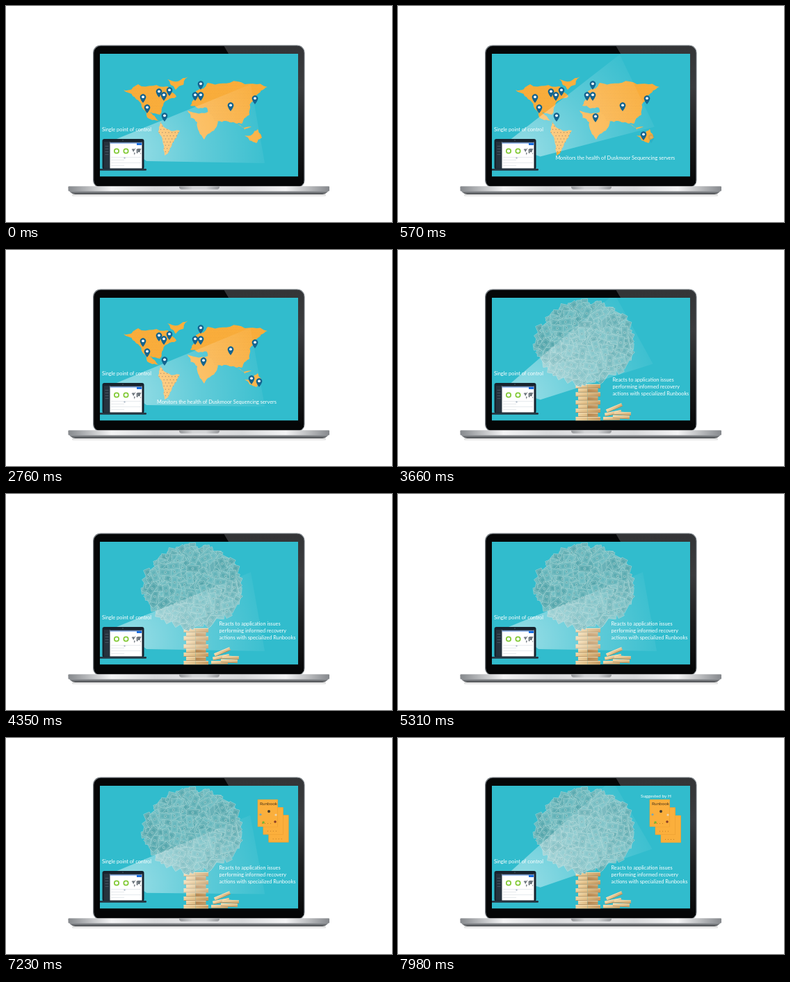
An HTML page with a canvas that plays this animation: 555x312 px, repeating every 8 s.

```html
<!DOCTYPE html>
<html lang="en">
<head>
<meta charset="utf-8">
<title>Single point of control</title>
<style>
html, body { margin: 0; width: 100%; height: 100%; overflow: hidden; background: #fff; }
canvas { display: block; width: 555px; height: 312px; }
</style>
</head>
<body>
<canvas id="stage" width="555" height="312"></canvas>
<script>
const W = 555, H = 312, LOOP = 8000;
const SCREEN = [135, 69, 285, 177.5];
const TEAL = '#31bccd', ORANGE = '#fbaf3c';
let ctx = document.getElementById('stage').getContext('2d');

const clamp = v => Math.max(0, Math.min(1, v));
const ramp = (t, from, to) => clamp((t - from) / (to - from));
const easeOut = v => 1 - (1 - v) ** 3;
const mix = (a, b, k) => a + (b - a) * k;
const seeded = seed => () => (seed = (seed * 16807) % 2147483647) / 2147483647;

function box(x, y, w, h, fill, radius = 0) {
  ctx.fillStyle = fill;
  ctx.beginPath();
  ctx.roundRect(x, y, w, h, radius);
  ctx.fill();
}
function disc(x, y, r, fill) {
  ctx.fillStyle = fill;
  ctx.beginPath();
  ctx.arc(x, y, r, 0, 7);
  ctx.fill();
}
const polygon = points => new Path2D('M' + points.join(' ') + 'Z');
function shape(path, fill) {
  ctx.fillStyle = fill;
  ctx.fill(path);
}
function text(str, x, y, size = 7.35, fill = '#fff') {
  ctx.font = size + 'px Lato, sans-serif';
  ctx.fillStyle = fill;
  ctx.fillText(str, x, y);
}
function gradient(x0, y0, x1, y1, ...colors) {
  const g = ctx.createLinearGradient(x0, y0, x1, y1);
  colors.forEach((c, i) => g.addColorStop(i / (colors.length - 1), c));
  return g;
}
function scoped(draw) {
  ctx.save();
  draw();
  ctx.restore();
}
function withAlpha(alpha, draw) {
  if (alpha > 0) scoped(() => { ctx.globalAlpha *= alpha; draw(); });
}
// Paints a still picture once and returns it as a layer.
function still(draw) {
  const layer = new OffscreenCanvas(W, H), outer = ctx;
  ctx = layer.getContext('2d');
  draw();
  ctx = outer;
  return layer;
}

// Roughens the outline through a few corner points into a coast.
function coast(corners, seed) {
  const rand = seeded(seed);
  let points = corners;
  for (let pass = 0; pass < 3; pass++)
    points = points.flatMap(([x, y], i) => {
      const [x2, y2] = points[(i + 1) % points.length];
      const bend = (rand() - .5) * .32;
      return [[x, y], [(x + x2) / 2 + (y2 - y) * bend, (y + y2) / 2 - (x2 - x) * bend]];
    });
  return polygon(points);
}
const northAmerica = coast([[169, 121], [190, 113], [232, 116], [245, 131], [224, 147], [221, 157], [207, 154], [223, 168], [203, 161], [190, 136]], 11);
const southAmerica = coast([[222, 168], [250, 180], [239, 198], [228, 216], [219, 182]], 5);
const eurasia = coast([[265, 144], [273, 123], [290, 111], [333, 109], [376, 117], [359, 130], [350, 157], [339, 170], [322, 168], [299, 165], [289, 147]], 23);
const lands = [
  northAmerica, southAmerica, eurasia,
  coast([[232, 106], [262, 102], [255, 114], [244, 121]], 8),
  coast([[261, 151], [293, 150], [305, 161], [299, 180], [285, 193], [275, 168]], 9),
  coast([[343, 187], [362, 178], [368, 190], [360, 198]], 4),
  coast([[333, 171], [354, 174], [343, 179]], 3)
];
function halftone(land, step, radius, tint) {
  scoped(() => {
    ctx.clip(land);
    for (let y = 100, row = 0; y < 220; y += step, row++)
      for (let x = 165 + (row % 2) * step / 2; x < 380; x += step) disc(x, y, radius, tint);
  });
}
const mapLayer = still(() => {
  for (const land of lands) shape(land, ORANGE);
  halftone(northAmerica, 2.4, .5, '#e79c35');
  halftone(eurasia, 2.4, .5, '#e79c35');
  halftone(southAmerica, 4.6, .75, '#8a5a24');
});

const oldPins = [[197, 140], [220, 132], [227, 137], [235, 130], [203, 155], [228, 167], [280, 121], [272, 137], [280, 137], [323, 152], [358, 142]];
const newPins = [[284, 168], [353, 194], [364, 198]];
function pin([x, y]) {
  ctx.fillStyle = '#14648f';
  ctx.beginPath();
  ctx.arc(x, y - 8.5, 4.4, Math.PI * .88, Math.PI * .12);
  ctx.quadraticCurveTo(x + 3, y - 3.5, x, y);
  ctx.quadraticCurveTo(x - 3, y - 3.5, x - 4.2, y - 7);
  ctx.fill();
  disc(x, y - 8.7, 1.9, '#fff');
}
function drawPins(t) {
  oldPins.forEach(pin);
  newPins.forEach((p, i) => withAlpha(ramp(t, 150 + 200 * i, 300 + 200 * i), () => pin(p)));
}

// Money tree on a tower of wooden blocks
function bill(x, y, angle, shade) {
  scoped(() => {
    ctx.translate(x, y);
    ctx.rotate(angle);
    box(-8.5, -4.5, 17, 9, `rgb(${86 + shade},${166 + shade},${172 + shade})`);
    ctx.lineWidth = .7;
    ctx.strokeStyle = '#a3d3d3';
    ctx.strokeRect(-8.5, -4.5, 17, 9);
    ctx.lineWidth = .4;
    ctx.strokeRect(-6.7, -2.9, 13.4, 5.8);
    disc(0, 0, 2, '#94c8c8');
    disc(0, 0, 1.1, '#62a8ae');
  });
}
function drawCanopy() {
  const rand = seeded(77), rim = 60, total = 280;
  ctx.fillStyle = '#69b2b8';
  ctx.beginPath();
  ctx.ellipse(268.5, 133.5, 60, 50, 0, 0, 7);
  ctx.fill();
  for (let i = 0; i < total; i++) {
    const onRim = i < rim;
    const angle = onRim ? i / rim * 2 * Math.PI : rand() * 2 * Math.PI;
    const r = onRim ? .94 + rand() * .1 : Math.sqrt(rand()) * .94;
    bill(268.5 + Math.cos(angle) * r * 64, 133.5 + Math.sin(angle) * r * 53, rand() * Math.PI, rand() * 22);
  }
}
function slab(x, y, w, h, light, dark) {
  box(x, y, w, h, gradient(x, 0, x + w, 0, light, dark));
  box(x, y, w, .9, '#f5e0b8');
  box(x, y + h - .7, w, .7, '#a67c49');
}
function drawTower() {
  for (let i = 0; i < 9; i++) {
    const y = 241 - i * 5.9, inset = i % 2 * 3.5;
    slab(255.5 + inset, y, 17 - inset, 5.8, '#efd3a2', '#dfbd86');
    slab(272.5, y, 18.5 - inset, 5.8, i % 2 ? '#b98a55' : '#d9b57d', '#c79d65');
  }
  for (let i = 0; i < 5; i++)
    scoped(() => {
      ctx.translate(295 + i % 2 * 13 + i, 241 - i * 2.6);
      ctx.rotate(i % 2 ? .05 : -.1 * i);
      slab(0, 0, 24, 4.6, '#f0d6a6', '#d6b079');
    });
}
const treeLayer = still(() => {
  drawTower();
  drawCanopy();
});

// The beam tilts up and back in 1650 ms, then rests until the next start.
function tiltAt(t) {
  const start = [7150, 5400, 2700, 0].find(s => t >= s);
  return Math.sin(Math.PI * ramp(t, start, start + 1650)) ** 2;
}
function drawBeam(t) {
  const tilt = -.35 * tiltAt(t), [cx, cy] = [180, 212];
  const swing = (dx, dy) => [
    cx + dx * Math.cos(tilt) - dy * Math.sin(tilt),
    cy + dx * Math.sin(tilt) + dy * Math.cos(tilt)
  ];
  const glow = ctx.createRadialGradient(cx, cy, 15, cx, cy, 205);
  glow.addColorStop(0, 'rgba(255,255,255,.45)');
  glow.addColorStop(.45, 'rgba(255,255,255,.23)');
  glow.addColorStop(1, 'rgba(255,255,255,.03)');
  shape(polygon([swing(-21, -20), swing(172, -99), swing(192, 15), swing(22, 12)]), glow);
}

// Small computer in the corner, with a miniature of the map
function drawConsole() {
  box(138.5, 192, 60, 44, '#17222d', 3);
  box(141, 196, 8.5, 38.5, '#27333e');
  box(149.5, 196, 46, 38.5, '#fff');
  box(149.5, 196, 46, 1.6, '#303c49');
  box(149.5, 197.6, 46, 1, '#4c86dc');
  box(188, 198, 7, 3, '#176de1');
  for (let i = 0; i < 4; i++) box(142.5, 202 + i * 4, 5, .6, '#667481');
  for (const x of [159, 172.5]) {
    ctx.strokeStyle = '#82c936';
    ctx.lineWidth = 1.7;
    ctx.beginPath();
    ctx.arc(x, 209.5, 3.2, 0, 7);
    ctx.stroke();
  }
  scoped(() => {
    ctx.translate(168.5, 196);
    ctx.scale(.07, .09);
    for (const land of lands) shape(land, '#6f777e');
  });
  for (let i = 0; i < 4; i++) box(151, 218 + i * 4, i % 2 ? 19 : 43, .6, '#ced6dc');
  disc(170.5, 219.5, 1.2, '#b5c0cb');
  disc(168, 194, .5, '#8996a0');
  box(134, 235, 68, 2.7, '#253642', 1.3);
}

function drawSheets(t) {
  const fan = easeOut(ramp(t, 6900, 7350));
  withAlpha(ramp(t, 6150, 6350), () => {
    for (let i = 2; i >= 0; i--) {
      const x = 362 + 8 * i * fan, y = 89 + 11.5 * i * fan;
      box(x - .3, y - .3, 29.1, 39.6, '#e2952b');
      box(x, y, 28.5, 39, ORANGE);
      if (fan > 0) for (let d = 0; d < 4; d++) box(x + 6 + d * 4, y + 34, 1, .7, '#a96b20');
    }
  });
  withAlpha(ramp(t, 6600, 6850), () => {
    text('Runbook', 365, 97, 6.4, '#4a3518');
    disc(378, 106, 2, '#493b2d');
    disc(366, 110.5, 1.6, '#7ba5b0');
    disc(388, 111, 1.6, '#e9d6b0');
    disc(370, 122, 1.8, '#75b536');
    disc(387, 121, 1.8, '#8a3f27');
  });
  text('Suggested by H'.slice(0, Math.floor(ramp(t, 7380, 7960) * 14)), 349, 86, 6.4);
}

// Captions glide in from beyond the right edge of the screen.
function drawCaption(t, start, lines, x, y) {
  const left = mix(421, x, easeOut(ramp(t, start, start + 890)));
  lines.forEach((line, i) => text(line, left, y + i * 9.6));
}

const computerLayer = still(() => {
  box(125, 56.5, 304.5, 206, '#777d82', 11);
  box(126.3, 57.7, 302, 204, '#050607', 10);
  scoped(() => {
    ctx.beginPath();
    ctx.roundRect(126.3, 57.7, 302, 204, 10);
    ctx.clip();
    shape(polygon([[313, 57], [429, 57], [429, 258], [420, 247], [420, 69], [320, 69]]),
      gradient(370, 57, 400, 258, '#333436', '#3a3b3d', '#1c1d1e', '#060708'));
  });
  box(95, 271, 365, 5, gradient(0, 271, 0, 276, 'rgba(0,0,0,.2)', 'rgba(0,0,0,0)'), 3);
  box(89.5, 260.5, 375.5, 11.5, gradient(0, 260, 0, 272, '#d0d1d3', '#b8babd', '#8b8e92', '#44474a'), [1, 1, 10, 10]);
  box(89.5, 260.5, 375.5, 7, gradient(89, 0, 465, 0, '#85888c', '#f4f4f5', '#d8d9db', '#e4e4e6', '#d8d9db', '#f4f4f5', '#85888c'), 1);
  box(249, 260.5, 58, 4.5, gradient(249, 0, 307, 0, '#96989b', '#d4d5d7', '#d4d5d7', '#96989b'), [0, 0, 4, 4]);
});

function frame(now) {
  const t = now % LOOP, change = ramp(t, 2850, 3100);
  ctx.clearRect(0, 0, W, H);
  ctx.drawImage(computerLayer, 0, 0);
  scoped(() => {
    ctx.beginPath();
    ctx.rect(...SCREEN);
    ctx.clip();
    box(...SCREEN, TEAL);
    withAlpha(1 - change, () => ctx.drawImage(mapLayer, 0, 0));
    withAlpha(change, () => ctx.drawImage(treeLayer, 0, 0));
    drawBeam(t);
    withAlpha(1 - change, () => {
      drawPins(t);
      drawCaption(t, 0, ['Monitors the health of Duskmoor Sequencing servers'], 217, 222);
    });
    drawCaption(t, 3000, ['Reacts to application issues', 'performing informed recovery', 'actions with specialized Runbooks'], 306.5, 190.3);
    drawSheets(t);
    drawConsole();
    text('Single point of control', 138, 181);
  });
}

(function play() {
  frame(performance.now());
  requestAnimationFrame(play);
})();
</script>
</body>
</html>
```
